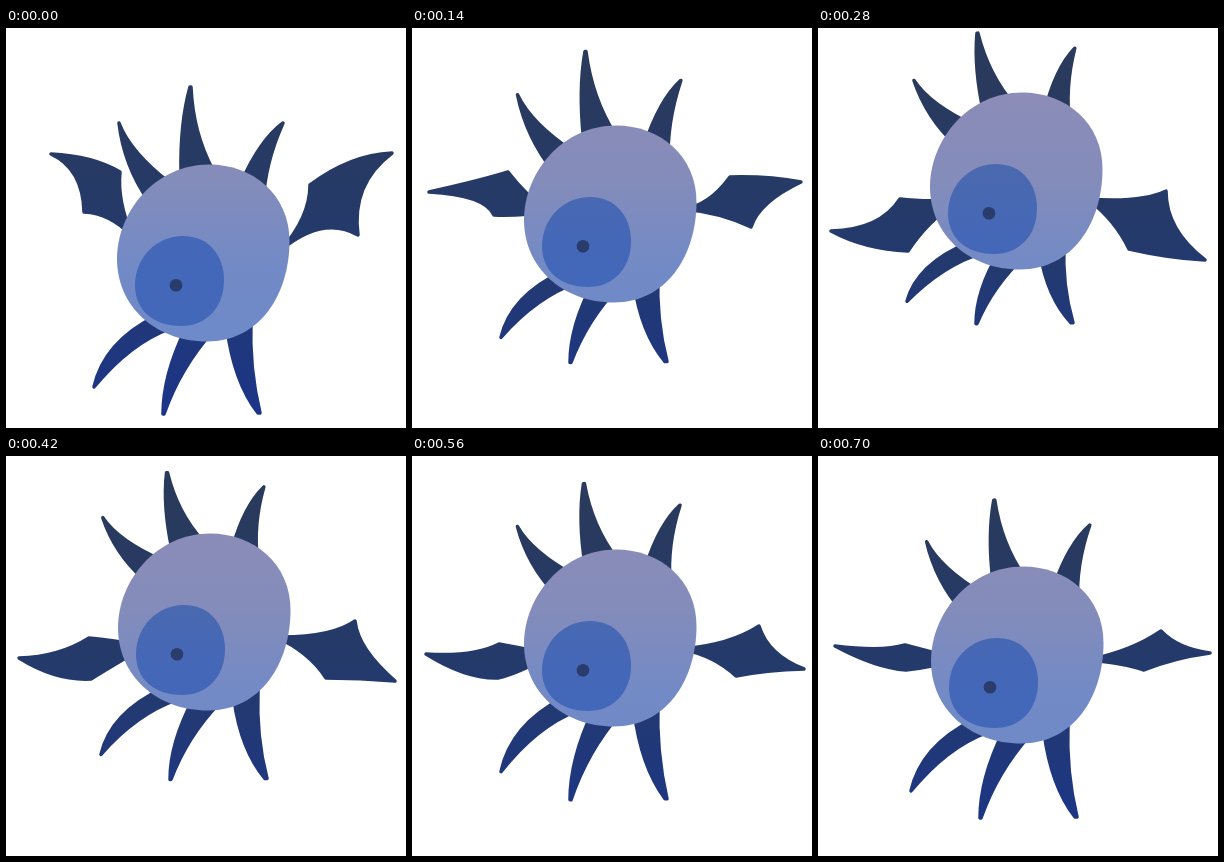
An HTML page with a canvas that plays this animation: 400x400 px, repeating every 0.84 s.

```html
<!DOCTYPE html>
<html lang="en">
<head>
<meta charset="utf-8">
<title>Flapping eye creature</title>
<style>
  html, body { margin: 0; width: 100%; height: 100%; overflow: hidden; background: #fff; }
  canvas { display: block; width: 100vmin; height: 100vmin; }
</style>
</head>
<body>
<canvas width="400" height="400"></canvas>
<script>
const ctx = document.querySelector('canvas').getContext('2d');
const HOLD = 140;

// Colours shade with height on the stage, not with the creature.
function shade(...stops) {
  const gradient = ctx.createLinearGradient(0, 0, 0, 400);
  for (const [y, color] of stops) gradient.addColorStop(y / 400, color);
  return gradient;
}
const limbColor = shade([40, '#2a3a5c'], [210, '#243a6b'], [300, '#20387a'], [390, '#1b3489']);
const bodyColor = shade([65, '#8c8cb8'], [150, '#848cba'], [240, '#728ac6'], [313, '#6e8ac8']);
const eyeColor = shade([130, '#4b69ae'], [220, '#4467b8'], [300, '#4268ba']);
const pupilColor = '#293c6c';

const body = new Path2D('M203 136.5C247 136.5 283.5 167 283.5 213C283.5 266 254 313.5 201 313.5C149 313.5 111 278 111 231C111 184 149 136.5 203 136.5Z');
const eye = new Path2D('M177 208C203 208 218 228 218 252C218 280 200 298 175 298C146 298 129 281 129 257C129 230 150 208 177 208Z');
const pupil = new Path2D();
pupil.arc(170, 257.3, 6.3, 0, 2 * Math.PI);

const horns = new Path2D(
  'M113 95Q124 124 164 155L142 172Q118 137 113 95Z' +
  'M184 59Q174 95 175 145L207 142Q187 105 185 59Z' +
  'M277 95Q254 112 235 155L257 175Q259 135 277 95Z');
const legs = new Path2D(
  'M88 359Q98 314 150 288L165 300Q124 315 88 359Z' +
  'M157 386Q157 347 180 300L207 303Q174 340 158 386Z' +
  'M252 385Q228 354 221 300L245 290Q243 340 254 385Z');

// Each wing runs root, upper joint, tip, lower joint, back to root.
const wing = d => new Path2D(d + 'Z');
const leftWings = [
  'M126 208Q111 172 114 144Q87 128 45 126Q77 141 78 184Q104 185 126 208',
  'M135 183Q113 166 96 144Q67 153 17 164Q73 167 82 187Q112 188 135 183',
  'M140 172Q105 174 82 171Q62 202 13 203Q46 221 90 223Q108 195 140 172',
  'M140 190Q105 184 83 182Q53 201 13 202Q50 225 85 223Q106 210 140 190',
  'M140 198Q108 192 87 188Q62 201 14 198Q54 223 86 222Q108 217 140 198',
  'M140 203Q106 194 87 189Q64 196 17 190Q58 212 88 214Q110 212 140 203'
].map(wing);
const rightWings = [
  'M275 222Q304 189 304 157Q344 127 386 125Q345 156 352 207Q317 187 275 222',
  'M270 181Q296 179 318 149Q357 148 389 154Q347 174 339 199Q308 184 270 181',
  'M270 171Q323 175 348 163Q348 202 387 232Q350 230 311 221Q298 193 270 171',
  'M270 181Q325 182 349 165Q352 193 389 225Q354 222 320 222Q303 196 270 181',
  'M270 193Q318 189 347 170Q356 199 392 213Q354 214 324 220Q303 200 270 193',
  'M270 204Q314 195 343 175Q360 193 392 197Q355 202 326 214Q306 207 270 204'
].map(wing);

// Offsets as [dx, dy, vertical stretch, degrees]
const poses = [
  { body: [0, 0], horns: [0, 0], legs: [0, 0] },
  { body: [1, -39], horns: [-8, -35.5, 1.03, -5], legs: [1, -51, 0.93] },
  { body: [1, -72], horns: [-19, -58.5, 0.94, -11.3], legs: [1, -89, 0.83] },
  { body: [1, -59], horns: [-18, -48.5, 0.89, -10.8], legs: [7, -62, 0.93] },
  { body: [1, -43], horns: [-8.5, -35, 0.94, -7.5], legs: [1, -42.5, 1.04] },
  { body: [2, -26], horns: [-5, -17.5, 0.96, -5.8], legs: [5, -24, 1] }
];

function moved(path, [dx, dy, stretch = 1, angle = 0], px = 0, py = 0) {
  const result = new Path2D();
  result.addPath(path, new DOMMatrix()
    .translate(px + dx, py + dy).rotate(angle).scale(1, stretch).translate(-px, -py));
  return result;
}

function fill(path, color) {
  ctx.fillStyle = color;
  ctx.fill(path);
}

function drawLimb(path) {
  fill(path, limbColor);
  ctx.stroke(path);
}

function draw(now) {
  const step = Math.floor(now / HOLD) % poses.length;
  const pose = poses[step];
  ctx.fillStyle = '#fff';
  ctx.fillRect(0, 0, 400, 400);
  ctx.strokeStyle = limbColor;
  ctx.lineWidth = 3.5;
  ctx.lineJoin = 'round';
  drawLimb(leftWings[step]);
  drawLimb(rightWings[step]);
  drawLimb(moved(horns, pose.horns, 195, 93));
  drawLimb(moved(legs, pose.legs, 166, 378));
  fill(moved(body, pose.body), bodyColor);
  fill(moved(eye, pose.body), eyeColor);
  fill(moved(pupil, pose.body), pupilColor);
}

const start = performance.now();
function tick() {
  draw(performance.now() - start);
  requestAnimationFrame(tick);
}
tick();
</script>
</body>
</html>
```
